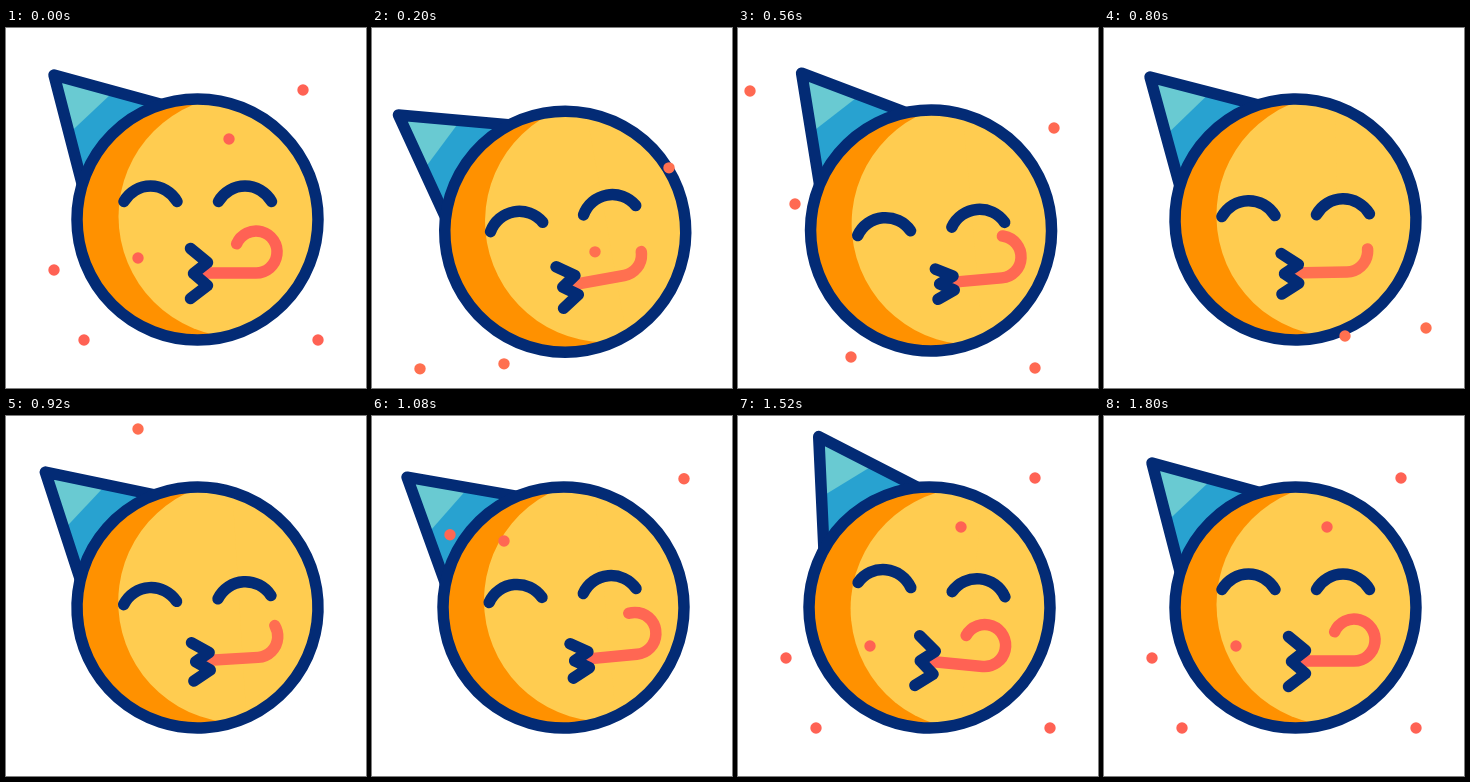
Write an HTML page that moves like this. It is 360 px wide and 360 px high and loops after 2 s.

```html
<!DOCTYPE html>
<html lang="en">
<head>
<meta charset="utf-8">
<title>Party face</title>
<style>
  html, body { margin: 0; width: 100%; height: 100%; overflow: hidden; background: #fff; }
  svg { display: block; width: 100vw; height: 100vh; }
  .line { fill: none; stroke: #032b75; stroke-width: 11.5; stroke-linecap: round; stroke-linejoin: round; }
</style>
</head>
<body>
<svg viewBox="0 0 360 360">
  <defs>
    <clipPath id="disc"><circle r="120.5"/></clipPath>
    <clipPath id="cone"><path d="M-143.5-144.5L-10-108L-110-15Z"/></clipPath>
  </defs>
  <g id="head">
    <g id="hat">
      <g clip-path="url(#cone)">
        <path fill="#28a2d0" d="M-160-160H0V0H-160Z"/>
        <path fill="#69cad2" d="M-160-160H-52L-87-125L-137-78H-160Z"/>
      </g>
      <path class="line" d="M-143.5-144.5L-10-108L-110-15Z"/>
    </g>
    <g id="face">
      <circle r="120.5" fill="#ff9100"/>
      <circle cx="42" cy="-3" r="121" fill="#ffcc50" clip-path="url(#disc)"/>
      <path fill="#ffcc50" clip-path="url(#disc)" d="M42-124H130V130H42Z"/>
      <circle class="line" r="120.5"/>
      <path id="eyes" class="line" d="M-73.5-18A30.5 30.5 0 0 1-20.5-18M21-18A30.5 30.5 0 0 1 74-18"/>
      <path id="horn" class="line" d="M2 53.5H58.5A21 21 0 1 0 39.2 24.3"/>
      <path id="mouth" class="line"/>
    </g>
  </g>
  <g id="confetti"></g>
</svg>
<script>
const LOOP = 2000, STEP = 40, REST = 1800;
const CENTER = 191.5, HORN_LENGTH = 147;
const FALL = 0.7, RUSH = 2; // pixels per ms
const OFFSTAGE = [0, -50];
const byId = id => document.getElementById(id);
const [head, hat, face, eyes, horn, mouth, confetti] =
  ['head', 'hat', 'face', 'eyes', 'horn', 'mouth', 'confetti'].map(byId);

// Smooth swell from 0 to 1 at the peak time and back.
function swell(t, peak, attack, release) {
  const u = (t - peak) / (t < peak ? attack : release);
  return Math.abs(u) < 1 ? Math.cos(u * Math.PI / 2) ** 2 : 0;
}

function pose(t) {
  const beat = (...shape) => swell(t, ...shape);
  const inhale = beat(400, 400, 240);
  return {
    dip: beat(400, 400, 300),
    tilt: -20.4 * inhale - 5.4 * beat(1080, 400, 160) + 7 * beat(1400, 200, 400),
    hatLag: 13.5 * beat(620, 190, 200) + 7.5 * beat(1420, 240, 380),
    drop: 16.5 * beat(560, 560, 880),
    shift: -16.5 * beat(400, 400, 120) + 8 * beat(570, 100, 130)
      - 8 * beat(800, 130, 160) + 10.5 * beat(1100, 160, 400),
    squash: 0.42 * beat(480, 480, 480) + 0.31 * beat(1060, 400, 480),
    roll: 0.79 * inhale + 0.38 * beat(800, 160, 480)
  };
}

// Dots that fall off the stage and drop back to rest: x, y, landing time
const fallers = [
  [297, 62, 1329], [312, 312, 1436], [78, 312, 1356],
  [48, 242, 1420], [132, 230, 1230], [223, 111, 1420]
].map(([x, y, land], i) => t => {
  const leaving = y + Math.max(0, t - 60) * (0.556 + 0.05 * i);
  if (leaving < 366 && t < 800) return [x, leaving];
  const landing = y - Math.max(0, land - t) * FALL;
  return landing > 12 ? [x, landing] : OFFSTAGE;
});

// Dots that rush past while drifting outward: a time, with x and y at that time
const rushers = [
  [560, 113, 329], [560, 57, 176], [560, 316, 100],
  [560, 12, 63], [800, 322, 300], [800, 241, 308]
].map(([at, x, y]) => t => [x + (x - 180) * 0.0012 * (t - at), y + RUSH * (t - at)]);

const dots = [...fallers, ...rushers].map(place => {
  const node = document.createElementNS('http://www.w3.org/2000/svg', 'circle');
  node.setAttribute('r', 5.7);
  confetti.append(node);
  return { node, place };
});

function draw(t) {
  const { dip, tilt, hatLag, drop, shift, squash, roll } = pose(t);
  const red = `rgb(255,${Math.round(98 + 36 * roll)},${Math.round(84 - 10 * roll)})`;
  head.setAttribute('transform', `translate(${CENTER + 3.5 * dip} ${CENTER + 24.5 * dip})`);
  hat.setAttribute('transform', `rotate(${tilt + hatLag})`);
  face.setAttribute('transform', `rotate(${tilt})`);
  eyes.setAttribute('transform', `translate(0 ${drop})`);
  horn.setAttribute('transform', `translate(${shift} 0)`);
  horn.style.stroke = red;
  horn.setAttribute('stroke-dasharray', `${HORN_LENGTH * (1 - roll)} 400`);
  const zigzag = [[-7, -25], [10, -11], [-4, 0], [10, 12], [-7, 25]];
  mouth.setAttribute('d', 'M' + zigzag.map(([x, y]) => `${x + shift} ${54 + y * (1 - squash)}`).join('L'));
  confetti.setAttribute('fill', red);
  for (const { node, place } of dots) {
    const [x, y] = place(t);
    node.setAttribute('cx', x);
    node.setAttribute('cy', y);
  }
}

const start = performance.now();
function tick() {
  const t = (performance.now() - start) % LOOP;
  draw(Math.min(REST, Math.floor(t / STEP) * STEP));
  requestAnimationFrame(tick);
}
tick();
</script>
</body>
</html>
```
